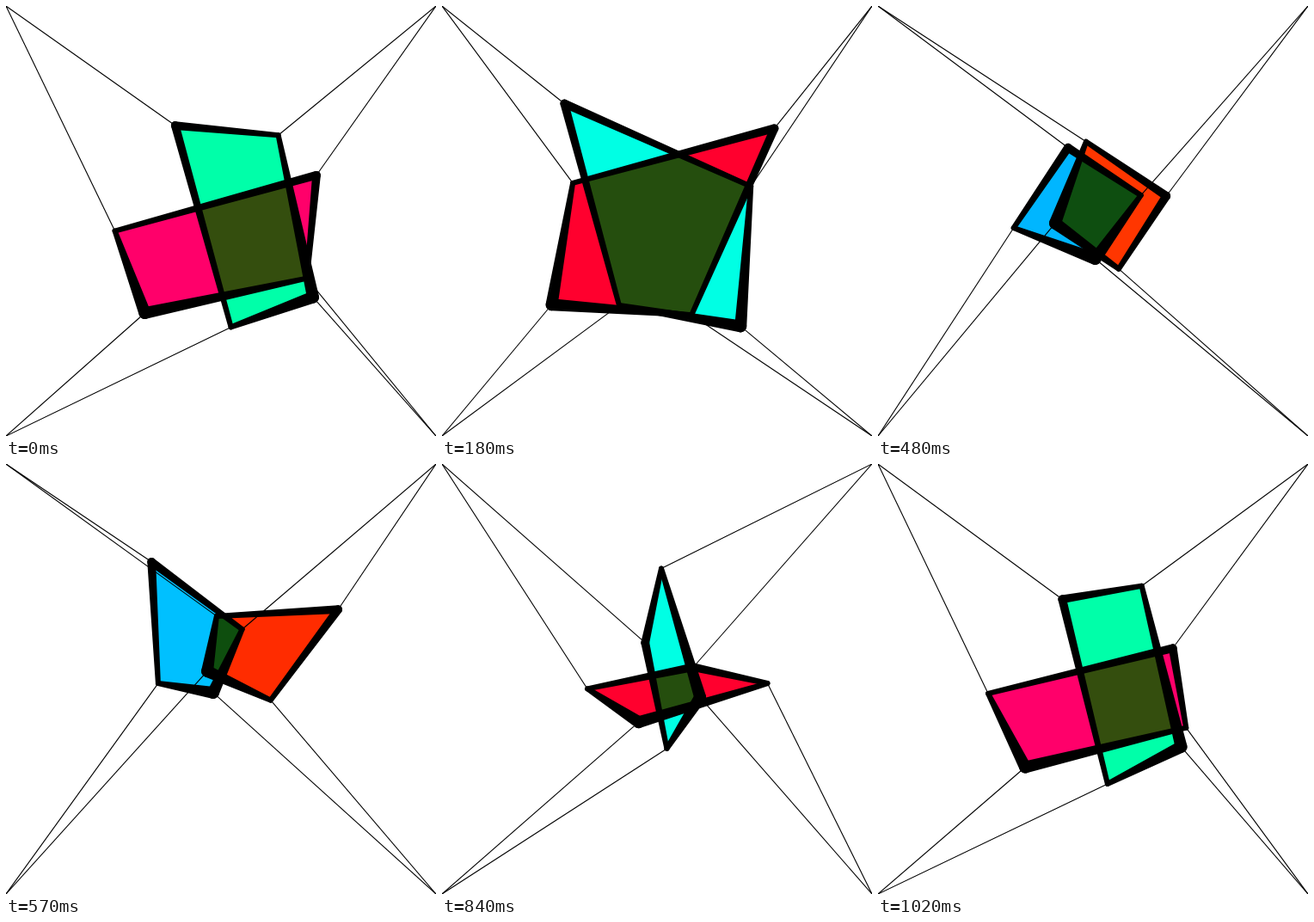
Recreate the animation shown at these times as an HTML page with a canvas. Size 500 by 500 pixels, loop 1.05 s.

```html
<!DOCTYPE html>
<html lang="en">
<head>
<meta charset="utf-8">
<title>Strung quads</title>
<style>
  html, body { margin: 0; width: 100%; height: 100%; overflow: hidden; background: #fff; }
  canvas { display: block; }
</style>
</head>
<body>
<canvas id="stage" width="500" height="500"></canvas>
<script>
const ctx = document.getElementById('stage').getContext('2d');
const LOOP = 1050, STEP = 30, SIZE = 500, TAU = Math.PI * 2;

// Each corner swings on a closed curve: x and y are [centre, cos, sin, cos2, sin2, ...].
const corners = [
  { anchor: [0, 0],       r: 4.9, x: [195, 0, -2, -2, -57, 0, 0, 3.8, 3.2], y: [154, 0, -2.4, -19.8, -54.5, 0, 0, 4.8, 2.1] },
  { anchor: [SIZE, 0],    r: 3,   x: [303.6, 13.5, 56.5, -0.5, -1],         y: [178.7, -28.5, 51.2, 0, -0.6] },
  { anchor: [SIZE, SIZE], r: 7,   x: [301.8, 56.2, 21.1, -1, -0.4],         y: [310.6, 30, 52.8, -2, 0] },
  { anchor: [0, SIZE],    r: 3,   x: [213.6, 48, -35, 0, 0.5],              y: [315.3, 59.6, 4.5, -1.5, -0.5] }
];

// Odd places hold cosines, even places sines, two per harmonic.
const wave = ([centre, ...terms], angle) => terms.reduce((sum, amp, i) => {
  const q = angle * (1 + (i >> 1));
  return sum + amp * (i % 2 ? Math.sin(q) : Math.cos(q));
}, centre);

function quarterTurn() {
  ctx.translate(SIZE, 0);
  ctx.rotate(Math.PI / 2);
}

function outline(points) {
  const path = new Path2D();
  points.forEach(p => path.lineTo(p.x, p.y));
  path.closePath();
  return path;
}

// Bar with round ends whose width runs from one corner radius to the other.
function taper(p, q) {
  const angle = Math.atan2(q.y - p.y, q.x - p.x);
  const dist = Math.hypot(q.x - p.x, q.y - p.y);
  const spread = Math.acos(Math.max(-1, Math.min(1, (p.r - q.r) / dist)));
  ctx.beginPath();
  ctx.arc(p.x, p.y, p.r, angle + spread, angle - spread + TAU);
  ctx.arc(q.x, q.y, q.r, angle - spread, angle + spread);
  ctx.fill();
}

function drawFrame(points) {
  ctx.fillStyle = ctx.strokeStyle = '#000';
  ctx.lineWidth = 1.1;
  points.forEach((p, i) => {
    taper(p, points[(i + 1) % 4]);
    ctx.beginPath();
    ctx.moveTo(...p.anchor);
    ctx.lineTo(p.x, p.y);
    ctx.stroke();
  });
}

function draw(t) {
  const angle = t / LOOP * TAU;
  const points = corners.map(({ anchor, r, x, y }) =>
    ({ anchor, r, x: wave(x, angle), y: wave(y, angle) }));
  const quad = outline(points);
  const sweep = (t + STEP / 2) % LOOP / LOOP;
  const hue = 158.5 + 41 * (1 - Math.abs(1 - 2 * sweep));

  ctx.fillStyle = '#fff';
  ctx.fillRect(0, 0, SIZE, SIZE);

  ctx.fillStyle = `hsl(${hue}, 100%, 50%)`;
  ctx.fill(quad);

  ctx.save();
  quarterTurn();
  ctx.fillStyle = `hsl(${hue + 175.5}, 100%, 50%)`;
  ctx.fill(quad);
  ctx.restore();

  ctx.save();
  ctx.clip(quad);
  quarterTurn();
  ctx.fillStyle = `hsl(${hue - 75}, 70%, 18%)`;
  ctx.fill(quad);
  ctx.restore();

  drawFrame(points);
  ctx.save();
  quarterTurn();
  drawFrame(points);
  ctx.restore();
}

const start = performance.now();
function tick() {
  const t = (performance.now() - start) % LOOP;
  draw(Math.floor(t / STEP) * STEP);
  requestAnimationFrame(tick);
}
tick();
</script>
</body>
</html>
```
